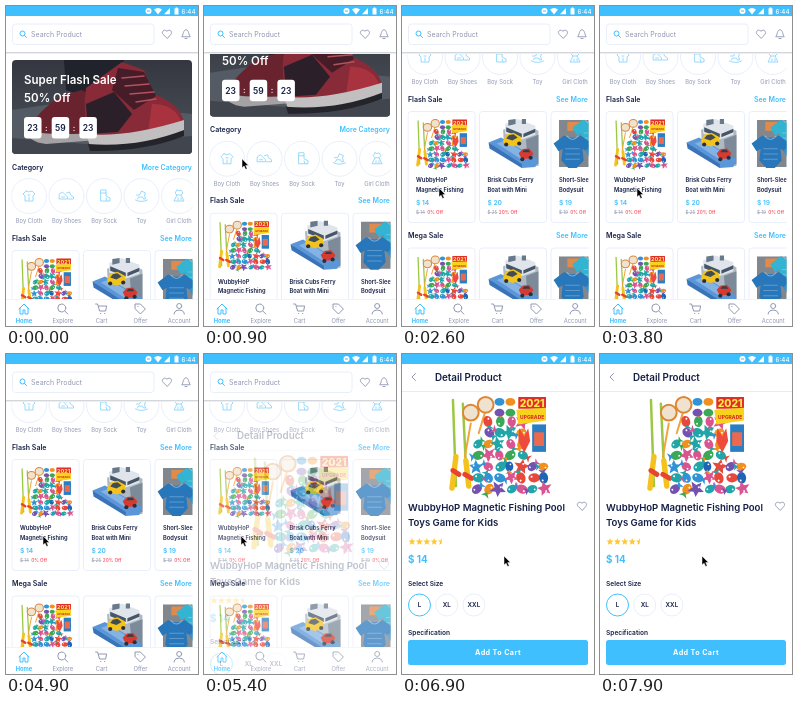
Write an HTML page that moves like this. It is 192 px wide and 320 px high and loops after 8000 ms.

```html
<!DOCTYPE html>
<html lang="en">
<head>
<meta charset="utf-8">
<title>Shop app</title>
<style>
html, body { margin: 0; width: 100%; height: 100%; overflow: hidden; background: #fff }
svg { display: block; width: 100vw; height: 100vh; font-family: Inter, "Open Sans", sans-serif }
</style>
</head>
<body>
<svg id="stage" viewBox="0 0 192 320"></svg>
<script>
const BLUE = '#40bfff', NAVY = '#151f45', GRAY = '#9098b1', PALE = '#e6ecfa', RED = '#fb5a68';
const LOOP = 8000;

let seed = 7;
const rnd = () => (seed = seed * 16807 % 2147483647) / 2147483647;

const text = (x, y, size, str, fill = NAVY, weight = 600, anchor = 'start', extra = '') =>
  `<text x="${x}" y="${y}" font-size="${size}" fill="${fill}" font-weight="${weight}" text-anchor="${anchor}" ${extra}>${str}</text>`;
const rect = (x, y, w, h, fill, r = 0, extra = '') =>
  `<rect x="${x}" y="${y}" width="${w}" height="${h}" rx="${r}" fill="${fill}" ${extra}/>`;
const circle = (x, y, r, fill, extra = '') => `<circle cx="${x}" cy="${y}" r="${r}" fill="${fill}" ${extra}/>`;
const path = (d, fill, extra = '') => `<path d="${d}" fill="${fill}" ${extra}/>`;
const line = (d, color, width = 1) =>
  path(d, 'none', `stroke="${color}" stroke-width="${width}" stroke-linecap="round" stroke-linejoin="round"`);
const at = (x, y, body, scale = 1) => `<g transform="translate(${x} ${y}) scale(${scale})">${body}</g>`;
const border = `stroke="${PALE}" stroke-width=".9"`;

const heart = line('M0 4.2L-4 .2C-6-2-3-5.500 0-2.800C3-5.500 6-2 4 .2Z', GRAY, .9);
const bell = line('M-4 2.500C-2.500 1-3-4.200 0-4.200S2.500 1 4 2.500ZM-1 4.500H1', GRAY, .9);

// Product pictures, each in a 100 x 100 box
function fishing() {
  const colors = ['#e8483c', '#2f93d6', '#f0901f', '#7552b0', '#3aa956', '#d9558f', '#1e66b4', '#20a5a8'];
  const color = () => colors[Math.floor(rnd() * 8)];
  let out = line('M4 4L7 92M14 8L17 70', '#9cc743', 2.5) + line('M7 62L3 94M17 66L20 92', '#f4c21c', 5.5) +
    line('M4 76L10 80M16 80L23 84', '#e5452f', 5) + line('M22 28L16 62M36 18L30 38', '#f2a33a', 2);
  for (const [x, y] of [[22, 17], [37, 9]])
    out += circle(x, y, 8, '#efe3cf', 'stroke="#dd8735" stroke-width="2"');
  for (let row = 0; row < 7; row++) for (let col = 0; col < 7; col++) {
    if (row < 4 && col > 4 || row < 2 && col < 1) continue;
    const body = (row + col) % 4 ?
      `<ellipse rx="4.600" ry="3.600" fill="${color()}"/>` + path('M3 0L7-3.500L6 0L7 3.500Z', color()) :
      path('M0-6L1.800-2L6-1.500L2.800 1.500L4 6L0 3.500L-4 6L-2.800 1.500L-6-1.500L-1.800-2Z', color());
    out += `<g transform="translate(${27 + col * 11.3 + rnd() * 3} ${26 + row * 11.5}) rotate(${rnd() * 360}) scale(${1.1 + rnd() * .2})">` +
      body + circle(-2, -1, .8, '#fff') + '</g>';
  }
  for (let i = 0; i < 4; i++)
    out += `<ellipse cx="${51 + i % 2 * 11}" cy="${6 + (i >> 1) * 11}" rx="5" ry="4" fill="${colors[i + 1]}"/>`;
  return out + rect(70, 1, 28, 12, '#df2f27') + text(84, 11.5, 10.5, '2021', '#ffe94a', 800, 'middle') +
    path('M68 14L98 12V25L70 29Z', '#f9d21d') + text(84, 23, 5, 'UPGRADE', '#d92f24', 800, 'middle') +
    rect(84, 29, 14, 28, '#2b7ec2') + rect(86, 37, 10, 14, '#eb6a4f') +
    path('M71 33L76 41L80 33L82 46L76 58L70 46Z', '#ee4b3d');
}

const ferry =
  path('M30 22L64 8L98 24V96H66L32 66Z', '#aeb9c4') +
  path('M34 10L58 0L92 14V32L66 42L34 30Z', '#dfe5ea') +
  path('M36 17L66 30V38L36 26ZM69 30L92 20V27L69 37Z', '#465568') +
  path('M40 2L54 0V10L40 14ZM66 0H74V10H66Z', '#68798c') +
  path('M74 42L98 32V92L78 98Z', '#7c8a99') +
  path('M2 48L26 38L98 82L92 98L66 100Z', '#5b97d8') +
  path('M2 48L66 92V100L4 60Z', '#3a73b8') + path('M18 50L34 44L84 77L68 84Z', '#83b2e3') +
  path('M30 44L36 32L50 28L64 36L66 48L50 56L32 52Z', '#f2c41b') + path('M36 40L41 33L50 31L58 38L48 44Z', '#424b52') +
  path('M60 70L68 61L80 60L88 70L84 80L66 82Z', '#d63a30') + path('M67 68L71 63L79 63L82 68Z', '#353d46') +
  [[36, 52], [61, 50], [67, 82], [83, 79]].map(([x, y]) => circle(x, y, 4, '#2b3036')).join('');

const onesie = c => path('M-12-24Q0-17 12-24L27-12L20 0L14-4L16 14L6 25H-6L-16 14L-14-4L-20 0L-27-12Z', c) +
  line('M-8-23Q0-13 8-23', '#ffffff60', 1.5) +
  line('M-10-4H10M-10 4H10M-10 12H10', '#ffffff40', 1.5);
const bodysuits = rect(0, 2, 100, 96, '#82878e') + rect(16, 6, 30, 18, '#e08a4c') +
  at(62, 34, onesie('#32b4d2'), 1.35) + at(26, 66, onesie('#2877bb'), 1.35) + at(80, 78, onesie('#3590cb'), 1.1);

const shoe = rect(6, 54, 180, 94, 'url(#dusk)') +
  path('M6 104L60 96L186 108V148H6Z', '#555b64') + path('M6 132L80 138L186 130V148H6Z', '#41454e') +
  path('M58 54H118L112 78L82 92L60 84Z', '#20232b') +
  path('M22 122Q34 104 54 90L76 84L98 98L92 130L40 134Z', '#69232e') +
  path('M20 124Q38 130 92 127V134L40 138Q22 136 20 124Z', '#a4a2a4') +
  path('M80 82Q94 72 116 56L138 64L148 88Q174 98 178 116L170 132L84 134Q76 106 80 82Z', '#892a38') +
  path('M112 62L138 66L150 90L128 104L106 84Z', '#451c27') + path('M146 98Q170 98 176 118L142 126Z', '#a8333f') +
  path('M80 98L108 86L126 108L112 126L82 128Z', '#2b2029') +
  path('M80 128Q120 132 178 114V126Q140 142 84 140Z', '#c2bfc0') + path('M82 138Q132 142 178 124V130Q138 146 84 145Z', '#24252b') +
  line('M116 72L138 70M119 80L143 78M124 88L148 86M130 96L150 93', '#b0535c', 1.5);

const photos = { fishing: fishing(), ferry, bodysuits };
const photo = (id, x, y, w, h) =>
  `<use href="#${id}" transform="translate(${x} ${y}) scale(${w / 100} ${h / 100})"/>`;

function productCard(i, id, title, price, old, off) {
  const x = 14 + i * 71.5;
  return rect(x - 8, 244.5, 67, 111, '#fff', 3, border) + photo(id, x, 252, 52, 49) +
    text(x, 315, 5.75, title[0]) + text(x, 324.5, 5.75, title[1]) +
    text(x, 337.5, 6.6, '$ ' + price, BLUE) +
    text(x, 347, 4.6, '$ ' + old, GRAY, 400, 'start', 'text-decoration="line-through"') +
    text(x + 11.3, 347, 4.6, off + '% Off', RED);
}

const saleRow = name => text(6, 234.5, 7, name) + text(186, 234.5, 7, 'See More', BLUE, 600, 'end') +
  '<g clip-path="url(#row)">' +
  productCard(0, 'fishing', ['WubbyHoP', 'Magnetic Fishing'], 14, 14, 0) +
  productCard(1, 'ferry', ['Brisk Cubs Ferry', 'Boat with Mini'], 20, 25, 20) +
  productCard(2, 'bodysuits', ['Short-Sleeve', 'Bodysuit'], 19, 19, 0) + '</g>';

const categories = [
  ['Boy Cloth', 'M-3-5L-6-2L-4 0V5H4V0L6-2L3-5Q0-3-3-5M-1-1H1M0 1V4'],
  ['Boy Shoes', 'M-7-2L-4-4L-1-1L1 1V3H-7ZM0-3L3-4L4-1L7 1V3H2M-5 1H-2'],
  ['Boy Sock', 'M-3-6H2V0L6 2V5H-3ZM-3-3H2M2 2L3 5'],
  ['Toy', 'M-5-1L-2-1L0-5L4-3L3-1L4 3H2L1 1H-3L-4 3M-6 4Q0 7 6 4'],
  ['Girl Cloth', 'M-2-6L-4-3L-2-1L-5 5H5L2-1L4-3L2-6Q0-4-2-6M-2-1H2M-1 2V4M2 2V4']
].map(([name, d], i) => at(23 + i * 37.5, 190, circle(0, 0, 17.5, '#fff', border) +
  line(d, '#7fd1fa', .8) + text(0, 27, 5.8, name, GRAY, 400, 'middle'))).join('');

const countdown = ['23', '59', '23'].map((n, i) =>
  rect(18 + i * 27.7, 111, 17.5, 21.5, '#fff', 3) +
  text(26.7 + i * 27.7, 125, 8.5, n, NAVY, 600, 'middle') +
  (i ? text(12.7 + i * 27.7, 124.5, 8, ':', '#fff', 600, 'middle') : '')).join('');

const homeBody = `<g clip-path="url(#banner)">${shoe}</g>` +
  text(18, 78, 11.5, 'Super Flash Sale', '#fff') + text(18, 96, 11.5, '50% Off', '#fff') + countdown +
  text(6, 163.5, 7, 'Category') + text(186, 163.5, 7, 'More Category', BLUE, 600, 'end') +
  `<g clip-path="url(#row)">${categories}</g>` + saleRow('Flash Sale') + at(0, 136.5, saleRow('Mega Sale'));

const homeBar = rect(0, 10, 192, 36, '#fff') + rect(0, 46, 192, 1, '#d3d7db') + rect(0, 47, 192, 1, '#eceef0') +
  rect(6.5, 18, 141.5, 20.5, '#fff', 3, border) +
  circle(16.5, 27.5, 2.5, 'none', `stroke="${BLUE}"`) + line('M18.500 29.500L20.500 31.500', BLUE) +
  text(25, 30.8, 7, 'Search Product', GRAY, 400) + at(161, 28, heart) + at(180, 28, bell);

const tabs = [
  ['Home', 'M-5 0L0-5L5 0M-4-1V5H-1V1H1V5H4V-1'],
  ['Explore', 'M3-1A4 4 0 1 1-5-1A4 4 0 1 1 3-1M2 2L5 5'],
  ['Cart', 'M-6-5H-4L-2 2H4L5-3H-3M-1 4.500H-.8M3 4.500H3.200'],
  ['Offer', 'M-5-5H0L5 0L0 5L-5 0ZM-2.500-2.500H-2.400'],
  ['Account', 'M2.500-3A2.500 2.500 0 1 1-2.500-3A2.500 2.500 0 1 1 2.500-3M-5 5V4Q-4 1 0 1T5 4V5']
].map(([name, d], i) => at(18 + i * 38.8, 303, line(d, i ? GRAY : BLUE, 1) +
  text(0, 14, 5.8, name, i ? GRAY : BLUE, i ? 400 : 700, 'middle'))).join('');

const star = (x, y) => path(`M${x} ${y - 3.5}l1 2.400 2.500.2-1.900 1.700.6 2.500-2.200-1.400-2.200 1.400.6-2.500-1.900-1.700 2.500-.2z`, '#ffc833');

const sizes = ['L', 'XL', 'XXL'].map((s, i) =>
  circle(17.5 + i * 27.2, 251, 11, '#fff', i ? border : `stroke="${BLUE}"`) +
  text(17.5 + i * 27.2, 253.3, 6.3, s, NAVY, 600, 'middle')).join('');

const detail = rect(0, 10, 192, 310, '#fff') + rect(0, 37, 192, 1, PALE) +
  line('M13.500 19.500L10 23L13.500 26.500', GRAY) + text(33, 26.5, 9.8, 'Detail Product') +
  photo('fishing', 47, 42, 99, 98) +
  text(6, 156.5, 9.6, 'WubbyHoP Magnetic Fishing Pool') + text(6, 172, 9.6, 'Toys Game for Kids') + at(180, 152, heart) +
  [0, 1, 2, 3].map(i => star(10 + i * 7.4, 187.5)).join('') +
  `<g clip-path="url(#half)">${star(39.6, 187.5)}</g>` +
  text(6, 209, 9.8, '$ 14', BLUE, 700) + text(6, 231.5, 6.6, 'Select Size') + sizes +
  text(6, 281, 6.6, 'Specification') + rect(6, 286, 180, 25, BLUE, 2.5) +
  text(96, 301, 7.2, 'Add To Cart', '#fff', 700, 'middle', 'letter-spacing=".4"');

const statusBar = rect(0, 0, 192, 10, BLUE) + circle(142.5, 5, 3, '#fff') + rect(141, 4.5, 3, 1, BLUE) +
  path('M148 3.500Q152 .5 156 3.500L152 8.500Z', '#fff') + path('M158 8.200L164 2V8.200Z', '#fff') +
  rect(168.5, 2.2, 4, 6.3, '#fff', .5) + rect(169.7, 1.4, 1.6, 1.5, '#fff') +
  text(189.5, 7.5, 6.2, '6:44', '#fff', 500, 'end');

const clip = (id, x, y, w, h, r) => `<clipPath id="${id}">${rect(x, y, w, h, '#000', r)}</clipPath>`;
const stage = document.getElementById('stage');
stage.innerHTML = '<defs>' + clip('row', 5.5, 150, 181, 260) + clip('banner', 6, 54, 180, 94, 4) + clip('half', 34, 180, 5.8, 14) +
  '<linearGradient id="dusk" x2="0" y2="1"><stop stop-color="#34373f"/><stop offset="1" stop-color="#4d525b"/></linearGradient>' +
  Object.entries(photos).map(([id, body]) => `<g id="${id}">${body}</g>`).join('') + '</defs>' +
  rect(0, 0, 192, 320, '#fff') + `<g id="scroller">${homeBody}</g>` + homeBar +
  rect(0, 293, 192, 27, '#fff') + rect(0, 293, 192, .6, PALE) + tabs +
  `<g id="detail">${detail}</g>` + statusBar +
  '<g id="cursor">' + path('M0 0V9L2.100 7.200L3.600 10.500L5.200 9.800L3.700 6.600H6.500Z', '#000', 'stroke="#fff" stroke-width=".5"') + '</g>';

const [scroller, page, cursor] = ['scroller', 'detail', 'cursor'].map(id => document.getElementById(id));

// Keys are [time, value, eased]
function track(t, keys) {
  const i = keys.findIndex(k => k[0] > t);
  if (i < 0) return keys[keys.length - 1][1];
  if (!i) return keys[0][1];
  const [t0, v0] = keys[i - 1], [t1, v1, eased] = keys[i];
  const p = (t - t0) / (t1 - t0);
  return v0 + (v1 - v0) * (eased ? p * p * (3 - 2 * p) : p);
}

const scrollKeys = [[500, 0], [900, 37], [1300, 132], [1500, 139]];
const cursorX = [[1700, 38], [2300, 37, 1], [6000, 37], [6600, 102, 1]];
const cursorY = [[500, 190], [900, 153], [1300, 102], [1500, 95], [1700, 95], [2300, 182, 1], [6000, 182], [6600, 202, 1]];
const openKeys = [[5300, 0], [5600, 1, 1]];

function draw(now) {
  const t = now % LOOP, open = track(t, openKeys);
  scroller.setAttribute('transform', `translate(0 ${-track(t, scrollKeys)})`);
  page.setAttribute('transform', `translate(0 ${80 * (1 - open)})`);
  page.setAttribute('opacity', open);
  cursor.setAttribute('transform', `translate(${track(t, cursorX)} ${track(t, cursorY)})`);
  cursor.setAttribute('opacity', t < 300 ? 0 : 1);
}

const start = performance.now();
function tick() {
  draw(performance.now() - start);
  requestAnimationFrame(tick);
}
tick();
</script>
</body>
</html>
```
